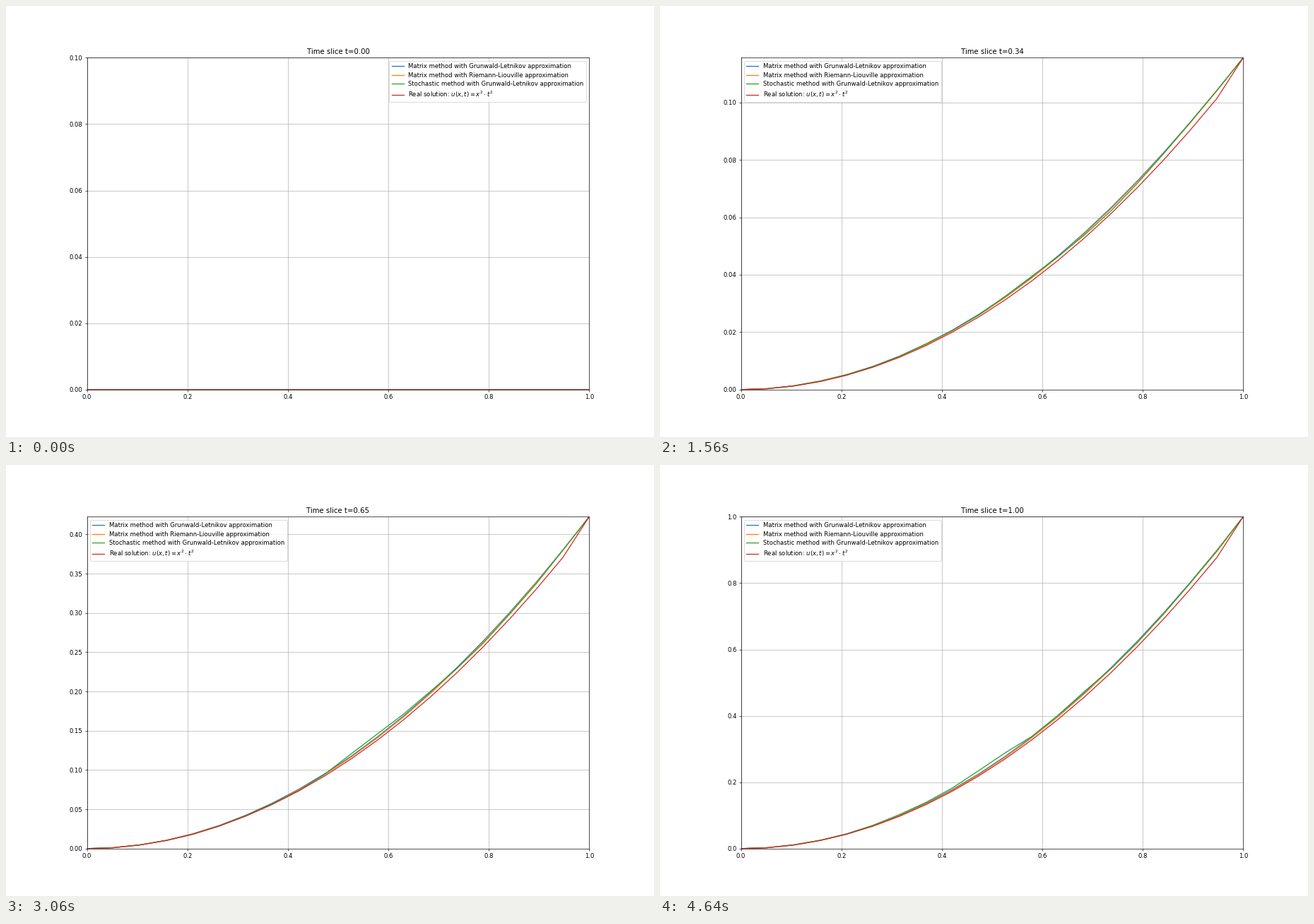
Animation of 917x611 px, one loop 4660 ms. Source, as a matplotlib script:

```python
import matplotlib.pyplot as plt
import numpy as np
from matplotlib.animation import FuncAnimation

WIDTH, HEIGHT, DPI = 917, 611, 61.1
TICK_MS, TICKS = 20, 233

plt.rcParams["font.family"] = "DejaVu Sans"

x = np.linspace(0, 1, 20)
exact = x ** 2


def stochastic_error(step):
    """Smoothed noise that grows with x and vanishes at both ends."""
    noise = np.random.default_rng(step).normal(size=x.size)
    smooth = np.convolve(noise, (0.4, 0.8, 0.4), mode="same")
    error = 0.006 * np.minimum(1, exact / 0.25) * (smooth - 0.2)
    error[-1] = 0
    return error


def solutions(step):
    """Curves at t = step / 100; all share the boundary value at x = 1."""
    real = 0.977 * exact
    real[-1] = 1
    # The numerical schemes overshoot most at early times.
    grunwald = exact * (1 + 0.4 / (step + 2) * (1 - x ** 8))
    riemann = grunwald * (1 - 0.02 * (1 - x))
    stochastic = grunwald + stochastic_error(step)
    return [(step / 100) ** 2 * u for u in (grunwald, riemann, stochastic, real)]


def step_at(tick):
    """Two short steps, then one held for five ticks."""
    cycle, phase = divmod(tick + 1, 7)
    return 3 * cycle + min(phase, 2) - 1


# A tiny margin keeps the pixel size from being truncated.
fig = plt.figure(figsize=((WIDTH + 1e-6) / DPI, (HEIGHT + 1e-6) / DPI), dpi=DPI)
ax = fig.add_subplot()
labels = (
    "Matrix method with Grunwald-Letnikov approximation",
    "Matrix method with Riemann-Liouville approximation",
    "Stochastic method with Grunwald-Letnikov approximation",
    r"Real solution: $u(x,t)=x^2\cdot t^2$",
)
# Without snapping, a flat curve stays visible just above the x axis.
lines = [ax.plot(x, 0 * x, label=label, snap=False)[0] for label in labels]
ax.set_xlim(0, 1)
ax.grid()
ax.legend(loc="best", labelspacing=0.43)


def update(tick):
    step = step_at(tick)
    t = step / 100
    for line, values in zip(lines, solutions(step)):
        line.set_ydata(values)
    ax.set_ylim(0, max(0.1, t ** 2))
    ax.set_title(f"Time slice t={t:.2f}")
    return lines


anim = FuncAnimation(fig, update, frames=TICKS, interval=TICK_MS,
                     init_func=lambda: update(0), repeat=True, repeat_delay=0)
plt.show()
```
